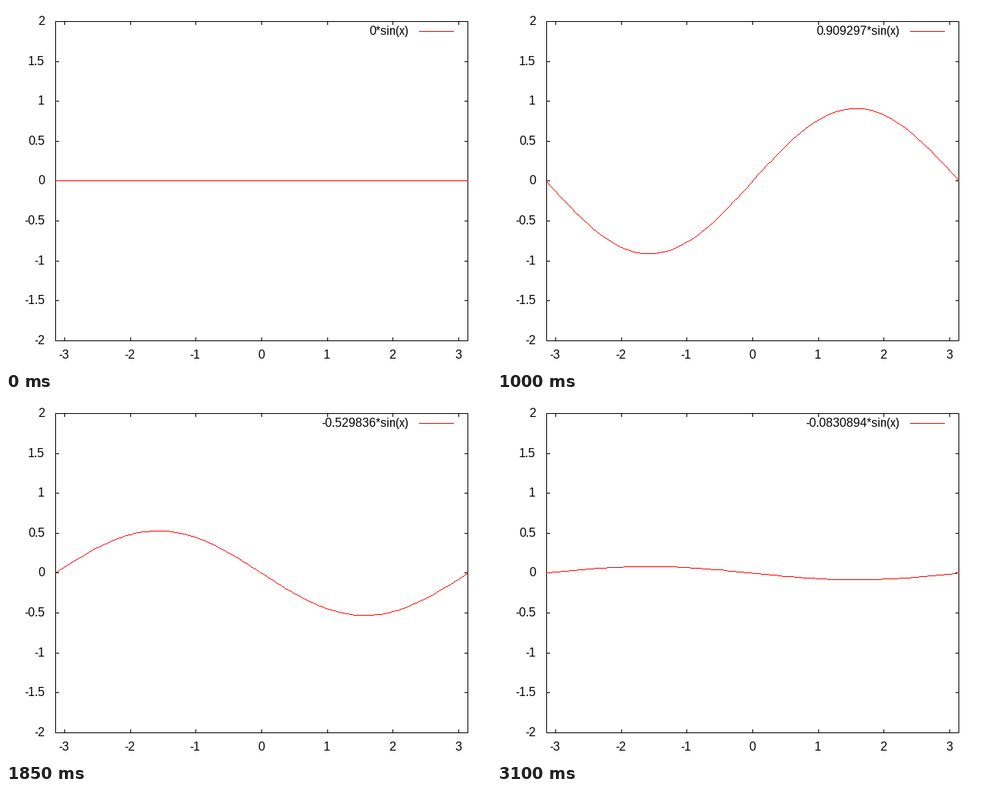
A matplotlib script that plays this animation: 640 by 480 pixels, repeating every 3.15 s.

```python
import numpy as np
import matplotlib.pyplot as plt
from matplotlib.animation import FuncAnimation

plt.rcParams.update({
    "font.family": "Liberation Sans",
    "font.size": 18,  # 16 px at 64 dpi
    "text.hinting": "default",
    "text.hinting_factor": 1,
})

W, H, DPI = 640, 480, 64
LEFT, RIGHT, TOP, BOTTOM = 65, 609, 20, 441
FRAMES, INTERVAL = 63, 50
SAMPLES, TICK = 100, 4
BASELINE = 5  # text baseline below the row it labels
KEY_ROW, KEY_X = 33, (545, 590)
BLACK, RED = (0, 0, 0), (255, 0, 0)


def col(x):
    return np.floor(LEFT + (x + np.pi) / (2 * np.pi) * (RIGHT - LEFT) + 0.5).astype(int)


def row(y):
    up = (y + 2) / 4 * (BOTTOM - TOP) + (H - 1 - BOTTOM)
    return H - 1 - np.floor(up + 0.5).astype(int)


def label(x, y, text, ha):
    return fig.text(x / W, 1 - y / H, text, ha=ha, va="baseline")


def segment(img, x0, y0, x1, y1):
    """One-pixel line without smoothing."""
    dx, dy = abs(x1 - x0), abs(y1 - y0)
    if dy > dx and y1 < y0:
        x0, y0, x1, y1 = x1, y1, x0, y0
    n = max(dx, dy, 1)
    t = np.arange(n + 1)
    xs = x0 + np.sign(x1 - x0) * ((2 * t * dx + n) // (2 * n))
    ys = y0 + np.sign(y1 - y0) * ((2 * t * dy + n) // (2 * n))
    img[ys, xs] = RED


def draw_axes():
    img = np.full((H, W, 3), 255, np.uint8)
    img[[TOP, BOTTOM], LEFT:RIGHT + 1] = BLACK
    img[TOP:BOTTOM + 1, [LEFT, RIGHT]] = BLACK
    for v in np.arange(-2, 2.5, 0.5):
        r = row(v)
        img[r, LEFT:LEFT + TICK + 1] = BLACK
        img[r, RIGHT - TICK:RIGHT + 1] = BLACK
        label(51, r + BASELINE, f"{v:g}", "right")
    for v in range(-3, 4):
        c = col(v)
        img[TOP:TOP + TICK + 1, c] = BLACK
        img[BOTTOM - TICK:BOTTOM + 1, c] = BLACK
        label(c - 0.5, 465, str(v), "center")
    img[KEY_ROW, KEY_X[0]:KEY_X[1] + 1] = RED
    return img


fig = plt.figure(figsize=(W / DPI, H / DPI), dpi=DPI, facecolor="white")
base = draw_axes()
picture = fig.figimage(base, origin="upper")
key = label(531, KEY_ROW + BASELINE, "", "right")

xs = np.linspace(-np.pi, np.pi, SAMPLES)
cols = col(xs)


def update(i):
    amp = np.sin(0.1 * i)
    img = base.copy()
    rows = row(amp * np.sin(xs))
    for k in range(SAMPLES - 1):
        segment(img, cols[k], rows[k], cols[k + 1], rows[k + 1])
    picture.set_data(img)
    key.set_text(f"{amp:g}*sin(x)")
    return picture, key


anim = FuncAnimation(fig, update, frames=FRAMES, interval=INTERVAL,
                     repeat=True, repeat_delay=0)
plt.show()
```
